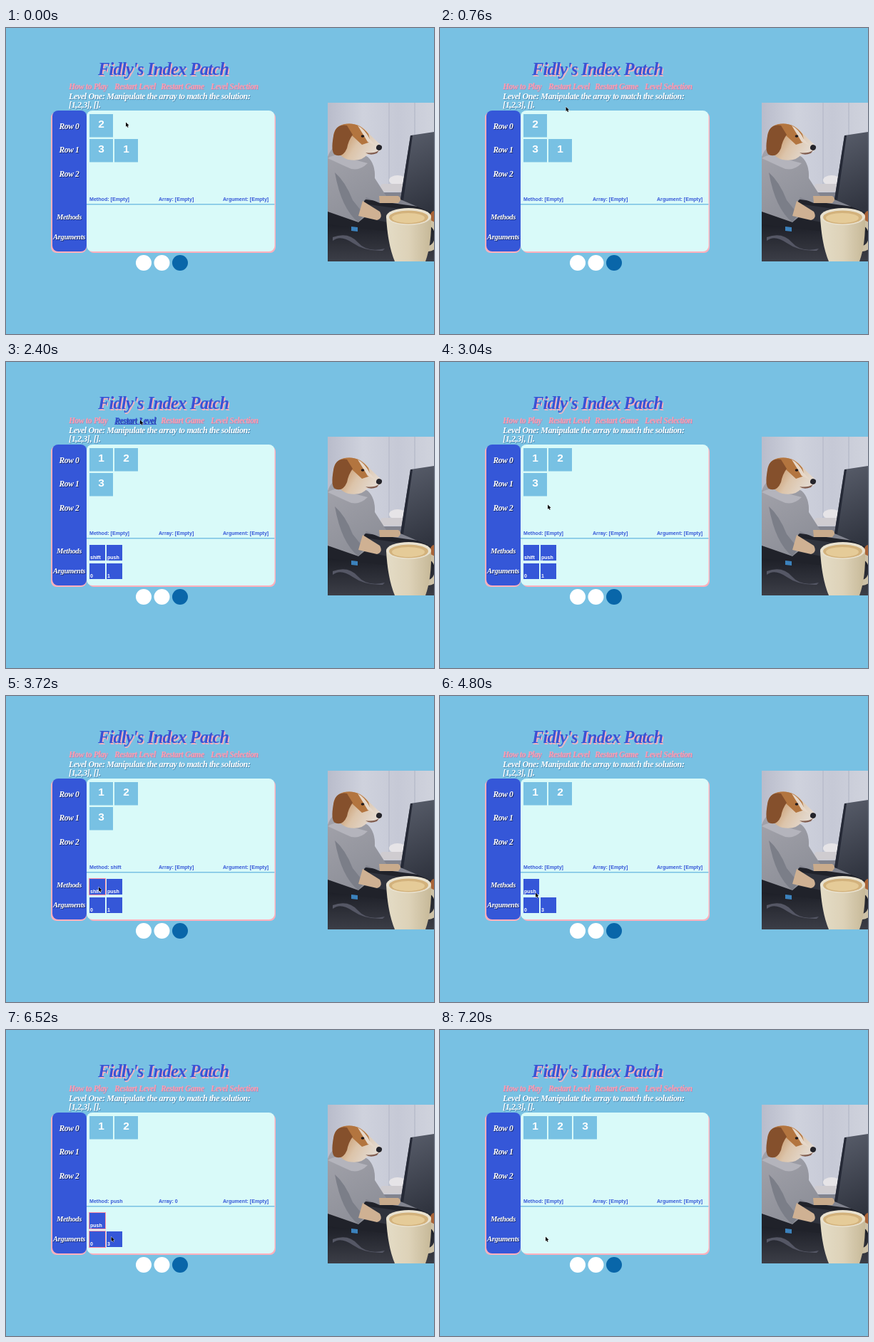
Recreate the animation shown at these times as an HTML page with a canvas. Size 600 by 430 pixels, loop 7.24 s.

```html
<!DOCTYPE html>
<html lang="en">
<head>
<meta charset="utf-8">
<title>Array puzzle</title>
<style>
html, body { margin: 0; width: 600px; height: 430px; overflow: hidden; background: #78c1e3; }
canvas { display: block; }
</style>
</head>
<body>
<canvas id="stage" width="600" height="430"></canvas>
<script>
const ctx = document.getElementById('stage').getContext('2d');
const LOOP = 7240;
const SKY = '#78c1e3', BLUE = '#3557d8', PINK = '#ffb0bc', MINT = '#d9faf9';
const SCRIPT = '"Liberation Serif", "Noto Serif", serif';
const SANS = '"Liberation Sans", Arial, sans-serif';

// Each step holds until the next one begins.
const steps = [
  { at: 0, rows: [[2], [3, 1]], methods: [], args: [] },
  { at: 1920, rows: [[1, 2], [3]], methods: ['shift', 'push'], args: [0, 1] },
  { at: 3600, method: 'shift' },
  { at: 4240, rows: [[1, 2]], methods: ['push'], args: [0, 3], method: null },
  { at: 5040, method: 'push' },
  { at: 6000, array: 0 },
  { at: 6720, rows: [[1, 2, 3]], methods: [], args: [], method: null, array: null }
];

// Pointer stops: time, x, y.
const stops = [
  [0, 168, 132], [400, 168, 132], [1200, 188, 81], [2520, 188, 81],
  [3400, 130, 268], [3760, 130, 268], [4120, 149, 291], [4320, 149, 291],
  [4720, 134, 276], [5200, 134, 276], [5640, 129, 288], [6120, 129, 288],
  [6560, 148, 290], [LOOP, 148, 290]
];

const menu = [['How to Play', 88], ['Restart Level', 152], ['Restart Game', 217], ['Level Selection', 287]];

function rect(x, y, w, h, color, radius = 0) {
  ctx.fillStyle = color;
  ctx.beginPath();
  ctx.roundRect(x, y, w, h, radius);
  ctx.fill();
}

function ellipse(x, y, rx, ry, color, turn = 0) {
  ctx.fillStyle = color;
  ctx.beginPath();
  ctx.ellipse(x, y, rx, ry, turn, 0, 7);
  ctx.fill();
}

function shape(d, color) {
  ctx.fillStyle = color;
  ctx.fill(new Path2D(d));
}

function text(str, x, y, font, color, align = 'left') {
  ctx.font = font;
  ctx.textAlign = align;
  ctx.fillStyle = color;
  ctx.fillText(str, x, y);
}

// Slightly tight bold italic with a hard shadow.
function script(str, x, y, size, color, shadow, offset = 1, align) {
  const font = `italic bold ${size}px ${SCRIPT}`;
  ctx.letterSpacing = `${-.03 * size}px`;
  text(str, x + offset, y + offset, font, shadow, align);
  text(str, x, y, font, color, align);
  ctx.letterSpacing = '0px';
}

function gradient(x0, y0, x1, y1, ...colors) {
  const g = ctx.createLinearGradient(x0, y0, x1, y1);
  colors.forEach((c, i) => g.addColorStop(i / (colors.length - 1), c));
  return g;
}

function photo() {
  ctx.save();
  ctx.beginPath();
  ctx.rect(451, 105, 149, 223);
  ctx.clip();
  rect(451, 105, 149, 223, gradient(451, 0, 600, 0, '#b9bccb', '#cfd2dd', '#c6c9d6', '#d0d3dd'));
  rect(536, 105, 2, 115, '#bcc0ce');
  rect(572, 105, 2, 60, '#bcc0ce');
  // Crockery and table
  ellipse(549, 214, 12, 7, '#e6e4e7');
  rect(525, 219, 44, 11, '#cfccd0', 4);
  shape('M505 231H600V290H451V250Z', '#82848f');
  shape('M451 270L600 280V328H451Z', gradient(0, 275, 0, 328, '#1d1f27', '#3c3e47'));
  shape('M458 294Q480 286 493 301T531 310L528 313Q503 314 486 302T458 299Z', '#555765');
  // Laptop
  shape('M451 257L505 241L600 254V287L546 287L451 276Z', '#20222a');
  shape('M467 260L509 248L559 255L535 273Z', '#30333d');
  shape('M567 151L600 146V261L553 241Z', gradient(555, 155, 600, 250, '#565b68', '#30343f'));
  shape('M567 151L570 151L557 242L553 241Z', '#252936');
  shape('M484 279L493 280V286L484 285Z', '#3b82bd');
  // Hoodie and paws
  shape('M451 181Q458 161 476 167L507 181Q518 191 517 211L533 236L524 246L505 238L500 247L511 259L494 273L451 258Z',
    gradient(455, 170, 510, 260, '#a2a2aa', '#8d8f98'));
  shape('M451 183Q464 174 480 183L507 190Q493 204 477 195Z', '#b4b4bc');
  shape('M461 203Q476 216 486 242L502 262L494 273Q470 254 461 203Z', '#7b7e88');
  shape('M523 236L550 236Q556 240 550 246L524 246Z', '#c9ab8c');
  shape('M500 243L524 258Q529 267 520 270L494 264Z', '#cfb193');
  // Dog
  shape('M459 160Q457 139 474 135Q496 132 508 148L525 164Q530 171 521 174L506 178Q499 188 480 185Q465 181 459 160Z',
    gradient(470, 145, 518, 175, '#c08a58', '#dcc4aa', '#e4dbd2'));
  shape('M472 136Q493 130 508 149L511 160L499 164L486 152Z', '#b3753f');
  shape('M459 152Q462 134 478 137L486 150Q480 158 478 169Q472 183 461 178Q455 174 459 152Z', '#85502c');
  shape('M493 137Q503 142 510 156L518 165L507 160Z', '#e6d8ca');
  ellipse(500, 152, 2.3, 1.7, '#21191a');
  ellipse(523, 168, 4, 4, '#24242b', .3);
  shape('M504 175Q515 177 523 172L520 176Q510 180 504 175Z', '#805c4e');
  // Hand and mug
  ellipse(600, 267, 6, 10, '#a96337');
  ctx.strokeStyle = '#cdc1a6';
  ctx.lineWidth = 8;
  ctx.beginPath();
  ctx.ellipse(592, 292, 13, 18, 0, -1.5, 1.7);
  ctx.stroke();
  shape('M533 265Q535 304 545 328H588Q597 303 596 265Z', gradient(533, 0, 597, 0, '#e4dcc6', '#ddd2b8', '#c6b897'));
  ellipse(564.5, 265, 31.5, 12, '#e9e2d0');
  ellipse(564.5, 266, 27.5, 9.5, '#d3b27c');
  ellipse(564, 267, 23, 7, '#e5cb98');
  ctx.restore();
}

function smallTile(label, col, y, selected) {
  const x = 117 + col * 24;
  rect(x, y, 22, 22, BLUE);
  if (selected) {
    ctx.strokeStyle = '#ff8fa3';
    ctx.lineWidth = 1;
    ctx.strokeRect(x - .5, y - .5, 23, 23);
  }
  text(label, x + 1, y + 20, `bold 7px ${SANS}`, '#fff');
}

function pointerAt(t) {
  const i = stops.findIndex(s => s[0] > t);
  const [t0, x0, y0] = stops[i - 1], [t1, x1, y1] = stops[i];
  const u = (t - t0) / (t1 - t0), e = u * u * (3 - 2 * u);
  return [x0 + (x1 - x0) * e, y0 + (y1 - y0) * e];
}

function drawPointer(x, y) {
  const arrow = new Path2D('M0 0V6.2L1.4 5L2.4 7.3L3.6 6.8L2.6 4.5H4.5Z');
  ctx.save();
  ctx.translate(x, y + .5);
  ctx.strokeStyle = '#fff';
  ctx.lineWidth = .8;
  ctx.stroke(arrow);
  ctx.fillStyle = '#000';
  ctx.fill(arrow);
  ctx.restore();
}

function header([px, py]) {
  script("Fidly's Index Patch", 129, 66, 24.3, '#3a52d4', PINK, 1.5);
  menu.forEach(([label, x], i) => {
    const hover = i === 1 && px > x && px < 212 && py > 75 && py < 89;
    script(label, x, 86, 11.5, hover ? BLUE : '#ff9db0', hover ? '#263c96' : '#a58fbb', .7);
    if (hover) rect(x, 87, 59, 1, BLUE);
  });
  script('Level One: Manipulate the array to match the solution:', 88, 100, 12, '#fff', '#4b86ad', .7);
  script('[1,2,3], [].', 88, 112, 12, '#fff', '#4b86ad', .7);
}

function board(s) {
  rect(63, 118, 50, 198, PINK, 8);
  rect(115, 118, 263, 198, PINK, 8);
  rect(65, 116, 48, 198, BLUE, 8);
  rect(113, 116, 263.5, 198, MINT, 8);
  rect(113, 247, 263.5, 1.5, SKY);
  [['Row 0', 142], ['Row 1', 175], ['Row 2', 209], ['Methods', 269], ['Arguments', 297]]
    .forEach(([label, y]) => script(label, 88.5, y, y < 250 ? 11.5 : 10.5, '#fff', '#182864', .8, 'center'));

  s.rows.forEach((row, r) => row.forEach((n, c) => {
    const x = 117 + c * 35, y = 121 + r * 35;
    rect(x, y, 33, 32.5, SKY);
    text(n, x + 16.5, y + 19.3, `bold 15.5px ${SANS}`, '#fff', 'center');
  }));
  const show = v => v ?? '[Empty]';
  const font = `bold 7.1px ${SANS}`;
  text(`Method: ${show(s.method)}`, 117, 243, font, BLUE);
  text(`Array: ${show(s.array)}`, 214, 243, font, BLUE);
  text('Argument: [Empty]', 304, 243, font, BLUE);
  s.methods.forEach((m, i) => smallTile(m, i, 257, m === s.method));
  s.args.forEach((a, i) => smallTile(a, i, 283, a === s.array));
}

function draw(now) {
  const t = now % LOOP;
  const state = Object.assign({}, ...steps.filter(s => s.at <= t));
  const pointer = pointerAt(t);
  rect(0, 0, 600, 430, SKY);
  header(pointer);
  board(state);
  ['#fff', '#fff', '#0966a9'].forEach((color, i) => ellipse(193 + i * 25.5, 330, 11, 11, color));
  photo();
  drawPointer(...pointer);
  requestAnimationFrame(draw);
}
requestAnimationFrame(draw);
</script>
</body>
</html>
```
